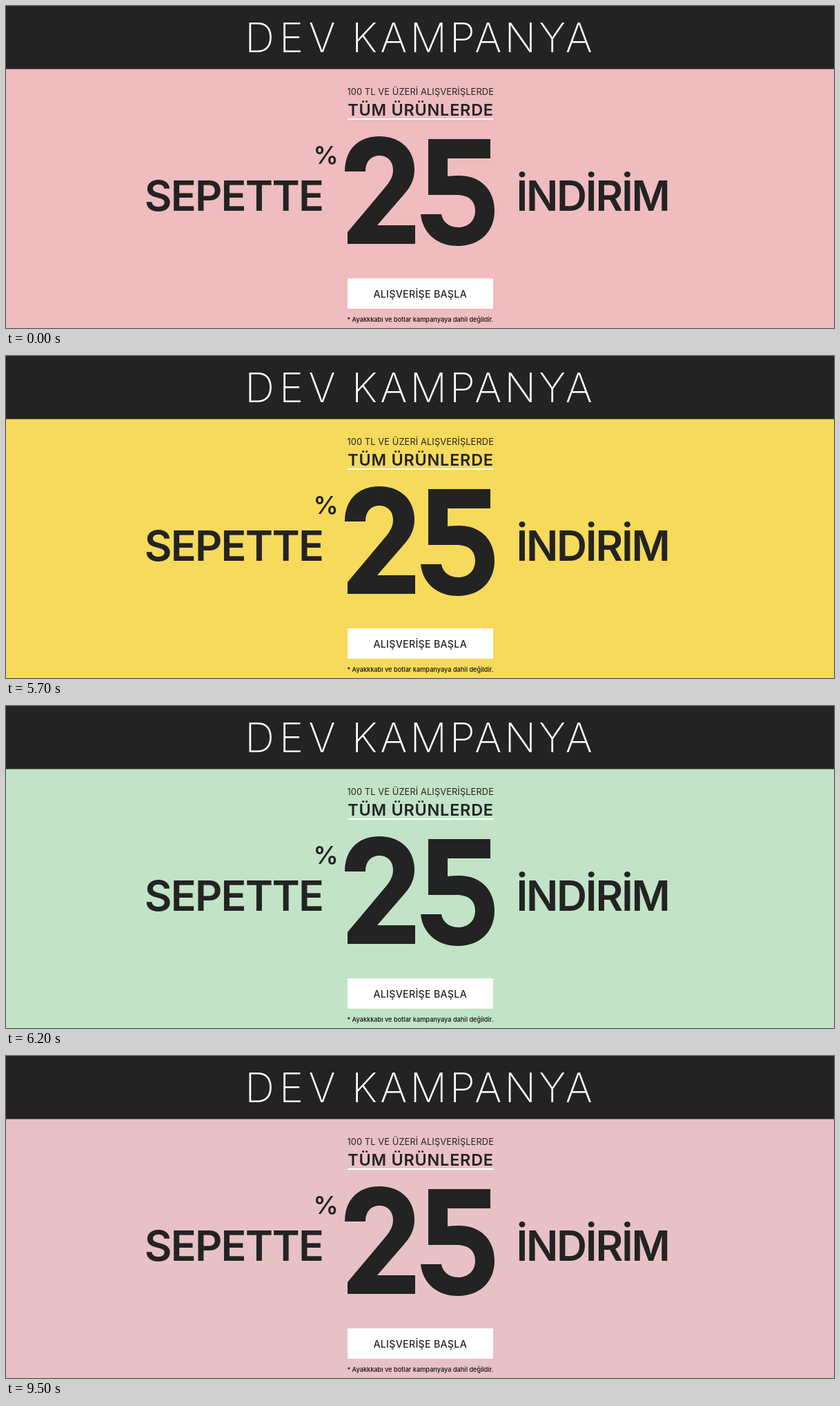
Write an HTML page that moves like this. It is 1200 px wide and 467 px high and loops after 9600 ms.

```html
<!DOCTYPE html>
<html lang="tr">
<head>
<meta charset="utf-8">
<title>Dev Kampanya</title>
<style>
  html, body { margin: 0; width: 100%; height: 100%; overflow: hidden; }
  svg { display: block; width: 100%; height: 100%; }
  text { font-family: Inter, "Open Sans", sans-serif; text-anchor: middle; fill: #232323; }
  .title { font-size: 59.5px; font-weight: 200; fill: #fff; }
  .terms { font-size: 12.8px; letter-spacing: .12px; }
  .scope { font-size: 23.4px; font-weight: 600; letter-spacing: .8px; }
  .word { font-size: 61px; font-weight: 600; }
  .percent { font-size: 36px; font-weight: 600; }
  .action { font-size: 14.2px; font-weight: 500; letter-spacing: .3px; }
  .note { font-size: 9.2px; font-weight: 500; fill: #111; }
</style>
</head>
<body>
<svg viewBox="0 0 1200 467">
  <rect id="backdrop" width="1200" height="467" fill="#efbcbf"/>
  <rect width="1200" height="91.5" fill="#232323"/>

  <text class="title" x="415.5" y="67" letter-spacing="7.3">DEV</text>
  <text class="title" x="677.5" y="67" letter-spacing="4.1">KAMPANYA</text>

  <text class="terms" x="600.7" y="129.3">100 TL VE ÜZERİ ALIŞVERİŞLERDE</text>
  <text class="scope" x="601" y="159">TÜM ÜRÜNLERDE</text>
  <rect x="495" y="163" width="211" height="2" fill="#fff"/>

  <text class="word" x="330" y="296.5" letter-spacing="-1.7">SEPETTE</text>
  <text class="percent" x="463.5" y="228.5">%</text>
  <g role="img" aria-label="25" fill="#232323">
    <path d="M491 240C491 208 511 189 541 189C572 189 592 209 592 237C592 252 586 263 577 273L538 318H593V345H495V328L552 260C558 252 561 246 561 238C561 225 553 217 541 217C529 217 521 226 521 240Z"/>
    <path d="M612 193H702V221H640V247Q648 246 657 246C687 246 708 266 708 297C708 327 687 348 655 348C625 348 604 330 601 302H631C633 314 643 321 656 321C669 321 680 312 680 297C680 283 671 274 653 274H612Z"/>
  </g>
  <text class="word" x="850" y="296.5" letter-spacing="-2.3">İNDİRİM</text>

  <rect x="495" y="395" width="211" height="44" fill="#fff"/>
  <text class="action" x="600.2" y="423">ALIŞVERİŞE BAŞLA</text>
  <text class="note" x="600.5" y="458">* Ayakkkabı ve botlar kampanyaya dahil değildir.</text>
</svg>
<script>
  const COLORS = [[239, 188, 191], [255, 216, 70], [174, 230, 242]];
  const PHASE = 3200, HOLD = 2500, STEP = 100, STEPS = 8;
  const backdrop = document.getElementById("backdrop");

  function draw(now) {
    const index = Math.floor(now / PHASE) % COLORS.length;
    const elapsed = now % PHASE - HOLD;
    // The fade advances in discrete eighths after each hold.
    const mix = elapsed < 0 ? 0 : (Math.floor(elapsed / STEP) + 1) / STEPS;
    const next = COLORS[(index + 1) % COLORS.length];
    const rgb = COLORS[index].map((c, i) => Math.round(c + (next[i] - c) * mix));
    backdrop.setAttribute("fill", `rgb(${rgb})`);
    requestAnimationFrame(draw);
  }
  requestAnimationFrame(draw);
</script>
</body>
</html>
```
